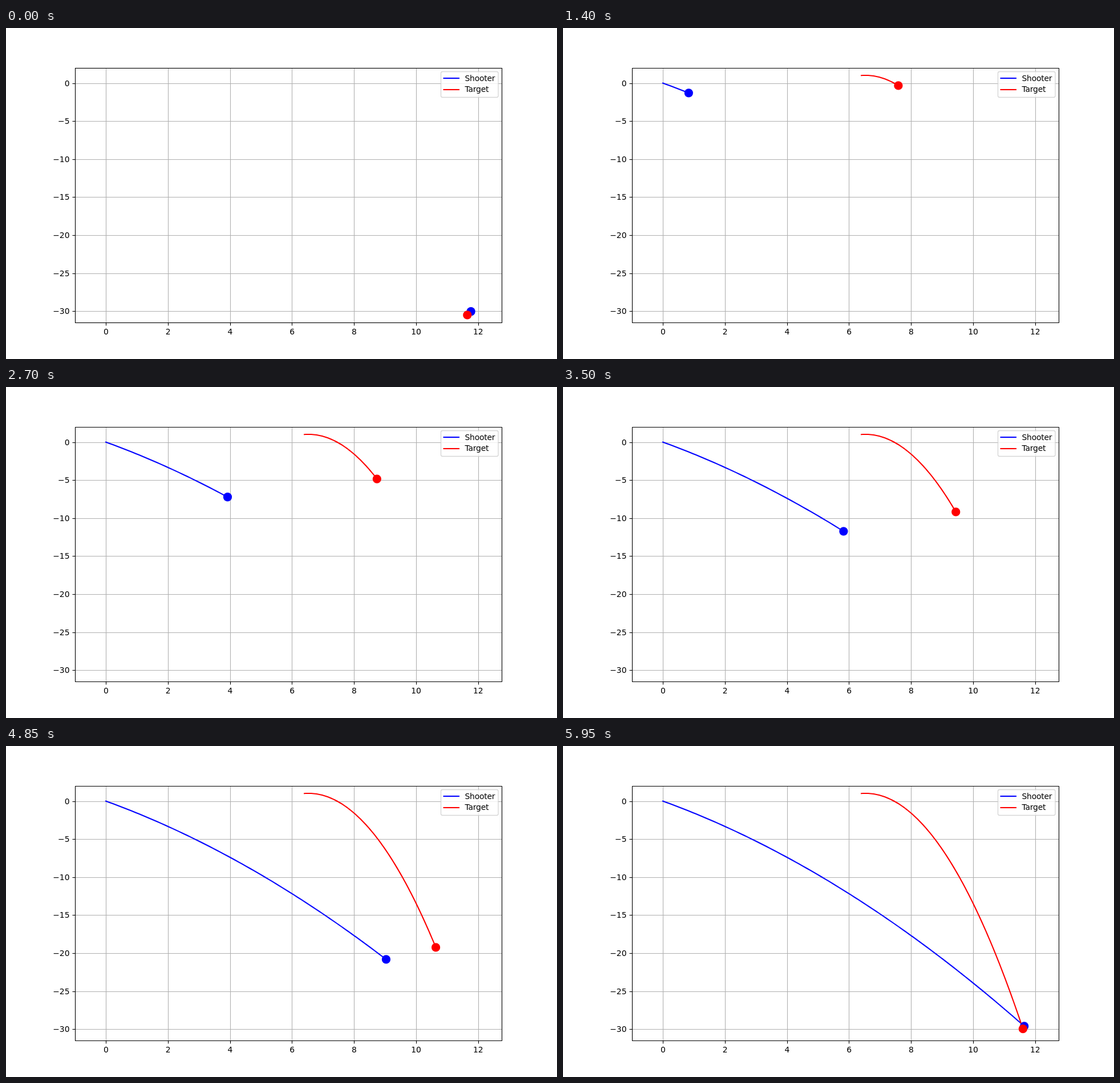
Animation, 966 px wide and 580 px high, one loop 6 s. Source, as an HTML page with a canvas:

```html
<!DOCTYPE html>
<html lang="en">
<head>
<meta charset="utf-8">
<title>Shooter and target</title>
<style>
  html, body { margin: 0; width: 100%; height: 100%; overflow: hidden; background: #fff; }
  canvas { display: block; }
</style>
</head>
<body>
<canvas id="stage" width="966" height="580"></canvas>
<script>
const ctx = document.getElementById('stage').getContext('2d');
const FRAME_MS = 50, COUNT = 120, PT = 100 / 72;
const BOX = { left: 120.75, right: 869.4, top: 69.6, bottom: 516.2 };
const BLUE = '#0000ff', RED = '#ff0000';
const G = 9.81, FLIGHT = 2.6, DELAY = 1, WAIT = 20;

const px = x => 175.12 + x * 54.37;
const py = y => 96.53 - y * 13.32;
const snap = v => Math.floor(v + 0.5) + 0.5;

function fall(x0, y0, vx, vy, t) {
  return [px(x0 + vx * t), py(y0 + vy * t - G * t * t / 2)];
}

const target = [], shooter = [];
for (let i = 0; i < COUNT; i++) {
  target.push(fall(6.4, 1, 2.021, 0.634, i * FLIGHT / (COUNT - 1)));
  const step = Math.max(0, i - WAIT);
  shooter.push(fall(0, 0, 7.357, -10.93, step * (FLIGHT - DELAY) / (COUNT - WAIT - 1)));
}

function line(x1, y1, x2, y2, color, width) {
  ctx.strokeStyle = color;
  ctx.lineWidth = width;
  ctx.beginPath();
  ctx.moveTo(x1, y1);
  ctx.lineTo(x2, y2);
  ctx.stroke();
}

function text(str, x, y, align) {
  ctx.fillStyle = '#000';
  ctx.textAlign = align;
  ctx.fillText(str, x, y);
}

const xTicks = [0, 2, 4, 6, 8, 10, 12];
const yTicks = [0, -5, -10, -15, -20, -25, -30];
const L = snap(BOX.left), R = snap(BOX.right), T = snap(BOX.top), B = snap(BOX.bottom);

function drawGrid() {
  ctx.lineCap = 'butt';
  for (const v of xTicks) line(snap(px(v)), T, snap(px(v)), B, '#b0b0b0', 0.8 * PT);
  for (const v of yTicks) line(L, snap(py(v)), R, snap(py(v)), '#b0b0b0', 0.8 * PT);
}

function drawAxes() {
  ctx.lineCap = 'butt';
  ctx.letterSpacing = '0px';
  for (const v of xTicks) {
    const x = snap(px(v));
    line(x, B, x, B + 5, '#000', 0.8 * PT);
    text(String(v), px(v) + 0.3, 537, 'center');
  }
  for (const v of yTicks) {
    const y = snap(py(v));
    line(L - 5, y, L, y, '#000', 0.8 * PT);
    text(String(v).replace('-', '\u2212'), 111.5, Math.round(py(v) + 5), 'right');
  }
  ctx.strokeStyle = '#000';
  ctx.lineWidth = 0.8 * PT;
  ctx.strokeRect(L, T, R - L, B - T);
}

function drawTrail(points, n, color) {
  if (n < 2) return;
  ctx.strokeStyle = color;
  ctx.lineWidth = 1.5 * PT;
  ctx.lineCap = 'square';
  ctx.lineJoin = 'round';
  ctx.beginPath();
  for (const p of points.slice(0, n)) ctx.lineTo(p[0], p[1]);
  ctx.stroke();
}

function drawDot(p, color) {
  ctx.fillStyle = color;
  ctx.beginPath();
  ctx.arc(p[0], p[1], 5.5 * PT, 0, 2 * Math.PI);
  ctx.fill();
}

function drawLegend() {
  ctx.beginPath();
  ctx.roundRect(762.5, 76.5, 100.5, 45, 2.8);
  ctx.fillStyle = 'rgba(255,255,255,0.8)';
  ctx.fill();
  ctx.strokeStyle = 'rgba(204,204,204,0.8)';
  ctx.lineWidth = PT;
  ctx.stroke();
  ctx.lineCap = 'butt';
  ctx.letterSpacing = '-0.2px';
  [['Shooter', BLUE, 88, 93], ['Target', RED, 108, 112]].forEach(([name, color, y, base]) => {
    line(766.5, y, 795, y, color, 1.5 * PT);
    text(name, 804.5, base, 'left');
  });
}

function draw(now) {
  const n = Math.floor(now / FRAME_MS) % COUNT;
  const last = (n + COUNT - 1) % COUNT;
  ctx.fillStyle = '#fff';
  ctx.fillRect(0, 0, 966, 580);
  ctx.font = 10 * PT + 'px "DejaVu Sans", sans-serif';
  drawGrid();
  drawTrail(shooter, n, BLUE);
  drawTrail(target, n, RED);
  drawDot(shooter[last], BLUE);
  drawDot(target[last], RED);
  drawAxes();
  drawLegend();
}

const start = performance.now();
function tick() {
  draw(performance.now() - start);
  requestAnimationFrame(tick);
}
tick();
</script>
</body>
</html>
```
